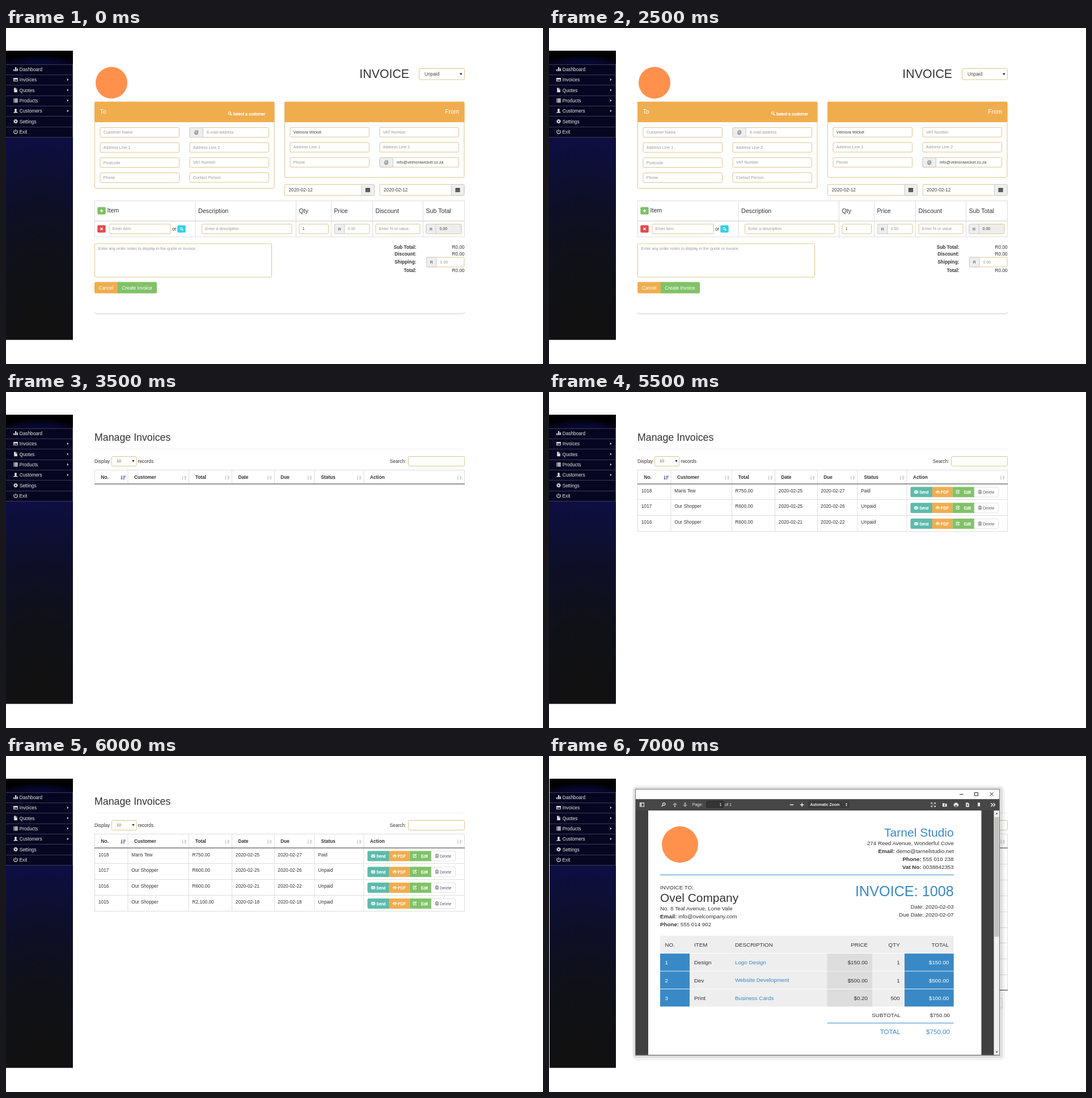
An HTML page for the animation above (8000 ms loop, 947 by 592 pixels).

```html
<!DOCTYPE html>
<html lang="en">
<head>
<meta charset="utf-8">
<title>Invoicing</title>
<style>
html, body { margin: 0; width: 100%; height: 100%; overflow: hidden; background: #fff; }
svg { display: block; width: 947px; height: 592px; font-family: "Liberation Sans", Arial, sans-serif; }
text { white-space: pre; }
</style>
</head>
<body>
<svg id="stage" viewBox="0 0 947 592" xmlns="http://www.w3.org/2000/svg"></svg>
<script>
const LOOP = 8000;
const S = 7.1, M = 8.29, L = 10.65;
const END = 'text-anchor="end"', MID = 'text-anchor="middle"', BOLD = 'font-weight="700"';
const ORANGE = '#f0ad4e', GREEN = '#81c268', BLUE = '#3989c6', LOGO = '#ff914d';

const light = {
  bg: '#fff', line: '#ddd', edge: '#dfc48e', ph: '#999', tx: '#444', ink: '#333', add: '#eee', bar: ORANGE,
  head: '#fff', plus: '#7cbf62', del: '#e2494b', find: '#34cfe6', ok: GREEN, logo: LOGO, frame: '#ccc'
};
const dim = {
  bg: '#828282', line: '#717171', edge: '#7d6d4b', ph: '#494949', tx: '#222', ink: '#1b1b1b', add: '#757575', bar: '#a67936',
  head: '#cfcfcf', plus: '#549a45', del: '#dd6039', find: '#3aa9b0', ok: '#5f8f4e', logo: '#cc7642', frame: '#666'
};

// y is the middle of the capitals
const text = (x, y, s, size = M, fill = '#333', more = '') =>
  `<text x="${x}" y="${(y + size * 0.355).toFixed(2)}" font-size="${size}" fill="${fill}" ${more}>${s}</text>`;
const rect = (x, y, x2, y2, fill, more = '') =>
  `<rect x="${x}" y="${y}" width="${x2 - x}" height="${y2 - y}" fill="${fill}" ${more}/>`;
const box = (x, y, x2, y2, fill, edge, r = 2) =>
  rect(x + 0.5, y + 0.5, x2 - 0.5, y2 - 0.5, fill, `stroke="${edge}" rx="${r}"`);
const line = (d, color, w = 1) => `<path d="${d}" fill="none" stroke="${color}" stroke-width="${w}"/>`;
const group = (id, body, more = '') => `<g id="${id}" ${more}>${body}</g>`;
const heavy = color => `stroke="${color}" stroke-width=".3"`;

// icons in a box from -4 to 4
const fillIcon = d => `<path d="${d}" fill="currentColor" fill-rule="evenodd"/>`;
const lineIcon = (d, w = 1.2) => `<path d="${d}" fill="none" stroke="currentColor" stroke-width="${w}"/>`;
const icons = {
  stats: fillIcon('M-4 0h2v3.5h-2zM-1-4h2.2v7.5h-2.2zM2-1.5h2v5h-2z'),
  card: fillIcon('M-4.2-3.2h8.4v6.4h-8.4zM-3.2-.2v2.3h6.4v-2.3z') + fillIcon('M-2.5 .6h2v.9h-2z'),
  file: fillIcon('M-3-4h3.2v3h2.8v5h-6zM.9-4l2.1 2.3h-2.1z'),
  list: fillIcon('M-4-3.6h1.4v1.4h-1.4zM-2-3.6h6v1.4h-6zM-4-1.5h1.4v1.4h-1.4zM-2-1.5h6v1.4h-6zM-4 .6h1.4v1.4h-1.4zM-2 .6h6v1.4h-6zM-4 2.7h1.4v1.2h-1.4zM-2 2.7h6v1.2h-6z'),
  user: fillIcon('M0-4C2.8-4 2.3-.7 1.1 .6C1.2 1.7 4 1.6 4 3.6H-4C-4 1.6-1.2 1.7-1.1 .6C-2.3-.7-2.8-4 0-4z'),
  cog: '<circle r="2.2" fill="none" stroke="currentColor" stroke-width="1.9"/><circle r="3.5" fill="none" stroke="currentColor" stroke-width="1.3" stroke-dasharray="1.4 1.35"/>',
  off: lineIcon('M-2-2.6A3.4 3.4 0 1 0 2-2.6M0-4.2V0'),
  search: '<circle cx="-.7" cy="-.7" r="2.3" fill="none" stroke="currentColor" stroke-width="1.2"/>' + lineIcon('M1 1L3.5 3.5', 1.6),
  plus: lineIcon('M-3.4 0H3.4M0-3.4V3.4', 2),
  cross: lineIcon('M-2.4-2.4L2.4 2.4M2.4-2.4L-2.4 2.4', 1.8),
  date: fillIcon('M-4-3.6h8v7.2h-8z') + '<path d="M-3.4-1.4h6.8M-3.4 .4h6.8M-3.4 2h6.8" stroke="#ccc" stroke-width=".5"/>',
  mail: fillIcon('M-4-3h8L0 .6zM-4-2.2L-1.4 .1L-4 2.6zM4-2.2L1.4 .1L4 2.6zM-3.6 3L-.9 .6L0 1.4L.9 .6L3.6 3z'),
  eye: fillIcon('M-4.2 0C-2-3.7 2-3.7 4.2 0C2 3.3-2 3.3-4.2 0zM-2.6 0C-1 2.2 1 2.2 2.6 0C2-1.2 1.4-1.5 1.4-1.5C1.6 1-1.6 1-1.4-1.5C-1.4-1.5-2-1.2-2.6 0z'),
  edit: lineIcon('M1-2.9H-3.2V2.9H2.6V.6', 1.1) + lineIcon('M-1 .6L3.4-3', 1.6),
  trash: lineIcon('M-3.2-2.6H3.2M-1-3.6H1M-2.5-2V3.4H2.5V-2M-.9-1V2.4M.9-1V2.4', .9),
  sort: fillIcon('M-3.4-4h1.4v5.4h1.2L-2.7 4L-4.6 1.4h1.2zM2-4L4-1.6H2.8V4H1.2V-1.6H0z') + lineIcon('M1.2 1H4.4M2-1H5', .8),
  sorted: fillIcon('M-3.4-4h1.4v5.4h1.2L-2.7 4L-4.6 1.4h1.2z') + lineIcon('M0-3.2H5M0-1.2H4.2M0 .8H3.2M0 2.8H2.2', 1.2),
  up: fillIcon('M0-4L4 0H1.4V4H-1.4V0H-4z'),
  panel: lineIcon('M-3.5-3.2H3.5V3.2H-3.5zM-1.2-3V3M-3-1H-1.6M-3 1H-1.6', 1.1),
  full: lineIcon('M-4-1.5V-3.7H-1.5M1.5-3.7H4V-1.5M4 1.5V3.7H1.5M-1.5 3.7H-4V1.5M-3.4-3.2L-1-1M3.4-3.2L1-1M3.4 3.2L1 1M-3.4 3.2L-1 1', 1),
  open: fillIcon('M-4-3h3l1 1h4v5.5h-8zM-.6 2.4h1.2V.8h1.4L0-1.2L-2 .8h1.4z'),
  print: fillIcon('M-2.6-3.6h5.2v2h1.8v4h-1.8v1.4h-5.2v-1.4h-1.8v-4h1.8zM-1.7 .5v2.4h3.4V.5z'),
  save: fillIcon('M-3-4h4l2 2v6h-6zM-.6-2v2h-1.4L0 2.4L2 0h-1.4v-2z'),
  mark: fillIcon('M-2-4h4v7.6L0 1.8L-2 3.6z'),
  more: lineIcon('M-3.6-3L-.6 0L-3.6 3M.4-3L3.4 0L.4 3', 1.5)
};
const icon = (name, x, y, color, k = 1) =>
  `<g transform="translate(${x} ${y}) scale(${k})" color="${color}">${icons[name]}</g>`;

function sidebar() {
  const items = [['stats', 'Dashboard'], ['card', 'Invoices', 1], ['file', 'Quotes', 1], ['list', 'Products', 1],
    ['user', 'Customers', 1], ['cog', 'Settings'], ['off', 'Exit']];
  let s = rect(0, 40, 118, 549.5, 'url(#night)') + rect(0, 63.5, 118, 192, '#05051c', 'fill-opacity=".85"');
  items.forEach(([name, label, sub], i) => {
    const y = 72.7 + i * 18.35;
    s += line(`M0 ${Math.round(y - 9.2) + 0.5}H118`, '#3b3b58') + icon(name, 17, y, '#ddd', 0.95) +
      text(i === 6 ? 23.5 : 23.7, y + 0.3, label, M, '#e8e8e8');
    if (sub) s += `<path d="M107.8 ${y - 2.2}l2.6 2.2l-2.6 2.2z" fill="#ddd"/>`;
  });
  return s + line('M0 192.5H118M117.5 63V193', '#3b3b58');
}

function field(c, x, y, x2, label, filled, y2 = y + 18) {
  return box(x, y, x2, y2, c.bg, c.edge) + text(x + 6.3, (y + y2) / 2 - 0.2, label, S, filled ? c.tx : c.ph);
}
function addon(c, x, y, x2, y2, mark, size = S) {
  return box(x, y, x2, y2, c.add, c.frame) + text((x + x2) / 2, (y + y2) / 2, mark, size, c.tx, MID);
}

function form(c) {
  const panel = (x, x2, y2) => box(x, 130, x2, y2, c.bg, c.edge, 2.4) + rect(x, 129.7, x2, 166, c.bar, 'rx="2"');
  const date = (x, x2) => box(x, 275, x2, 295.5, c.bg, c.edge) + box(x2 - 23.5, 275, x2, 295.5, c.add, c.frame) +
    text(x + 7.5, 285.5, '2020-02-12', M, c.tx) + icon('date', x2 - 12, 285.5, c.ink);
  let s = `<circle cx="186" cy="96.5" r="28" fill="${c.logo}"/>` +
    text(711, 80.8, 'INVOICE', 21.32, c.ink, END) +
    box(728, 71, 809, 91.5, c.bg, c.edge) + text(738, 81.5, 'Unpaid', M, c.tx) +
    `<path d="M800 79.5h4.6l-2.3 4z" fill="${c.ink}"/>`;

  s += panel(156, 473.5, 283) + text(165.5, 147.5, 'To', L, c.head) + icon('search', 395, 150.5, c.head, 0.9) +
    text(400.3, 151, 'Select a customer', S, c.head, heavy(c.head));
  ['Customer Name', 'Address Line 1', 'Postcode', 'Phone'].forEach((n, i) => s += field(c, 165.5, 175 + i * 26.6, 306, n));
  ['', 'Address Line 2', 'VAT Number', 'Contact Person'].forEach((n, i) => s += field(c, 323.5, 175 + i * 26.45, 464, n));
  s += addon(c, 323.5, 175, 348, 193, '@', M) + text(354, 183.8, 'E-mail address', S, c.ph);

  s += panel(491, 808.5, 264) + text(799, 147.5, 'From', L, c.head, END);
  ['Velmora Wicket', 'Address Line 1', 'Phone'].forEach((n, i) => s += field(c, 500.5, 174.5 + i * 26.6, 641, n, !i));
  ['VAT Number', 'Address Line 2', ''].forEach((n, i) => s += field(c, 658.5, 174.5 + i * 26.6, 799, n));
  s += addon(c, 658.5, 228, 683, 245.5, '@', M) + text(689, 236.8, 'info@velmorawicket.co.za', S, c.tx) +
    date(491, 650) + date(658.5, 808.5);

  s += line('M156.5 304.5H808.5V368H156.5zM334 304V368M511.5 304V368M573.5 304V368M646.5 304V368M735.5 304V368', c.line) +
    line('M156 340H809', c.line, 1.6);
  [['Item', 178.5, 321], ['Description', 339], ['Qty', 516.5], ['Price', 578.5], ['Discount', 651.5], ['Sub Total', 740.5]]
    .forEach(([n, x, y = 322.7]) => s += text(x, y, n, L, c.ink));
  const chip = (x, y, color, name) => rect(x, y, x + 14.4, y + 13, color, 'rx="1.8"') + icon(name, x + 7.2, y + 6.5, '#fff', 0.82);
  s += chip(161.3, 315.5, c.plus, 'plus') + chip(161.3, 347.5, c.del, 'cross') + chip(302.3, 347.5, c.find, 'search') +
    field(c, 181.5, 345, 291, 'Enter item') + text(293, 353.8, 'or', M, c.ink) +
    field(c, 345, 345, 504.5, 'Enter a description') + field(c, 516.5, 345, 569, '1', true) +
    field(c, 579, 345, 641.5, '') + addon(c, 579, 345, 597.5, 363, 'R') + text(602.5, 353.8, '0.00', S, c.ph) +
    field(c, 651.5, 345, 730.5, 'Enter % or value') +
    box(740.5, 345, 803.5, 363, c.add, c.edge) + addon(c, 740.5, 345, 758.5, 363, 'R') + text(764.5, 353.8, '0.00', S, c.tx);

  s += box(156, 379.5, 469, 439.5, c.bg, c.edge) +
    text(162.5, 388.7, 'Enter any order notes to display in the quote or invoice.', S, c.ph);
  [['Sub Total:', 386], ['Discount:', 398], ['Shipping:', 412.2], ['Total:', 427.5]].forEach(([n, y], i) => {
    s += text(723.5, y, n, M, c.ink, BOLD + END.padStart(22));
    if (i !== 2) s += text(808.7, y, 'R0.00', M, c.ink, END);
  });
  s += field(c, 741, 403.5, 808.5, '') + addon(c, 741, 403.5, 759.5, 421.5, 'R') + text(765.5, 412.3, '0.00', S, c.ph);
  s += rect(156, 447.5, 199, 467.5, c.bar, 'rx="2"') + rect(197, 447.5, 266, 467.5, c.ok, 'rx="2"') + rect(197, 447.5, 200, 467.5, c.ok) +
    text(163.7, 457.7, 'Cancel', M, c.head) + text(204.3, 457.7, 'Create Invoice', M, c.head);
  return s + line('M156.5 500.5Q156.5 503.5 160 503.5H805Q808.5 503.5 808.5 500.5', c.frame);
}

function modal() {
  let s = rect(288, 51, 661, 287, '#000', 'fill-opacity=".06" rx="12"') + rect(291, 54, 656, 281, '#000', 'fill-opacity=".1" rx="8"') +
    rect(294, 57, 653, 277, '#000', 'fill-opacity=".22" rx="5"') + box(296, 58, 651, 274, '#fff', '#666', 3);
  s += text(305.5, 74.7, 'Select a customer', L) + text(637.8, 72.5, '×', 12.5, '#bbb', BOLD + ' ' + MID) +
    line('M297 91.5H650M297 235.5H650', '#e5e5e5') + text(537.5, 109.3, 'Search:', M, '#333', END) +
    box(541.5, 100.5, 642, 118.5, '#fff', light.edge);
  s += line('M305.5 150V125.5H641.5V206M305.5 150V206M422.5 125V206M537 125V206M305 178H642', '#ddd') +
    line('M305 149.7H642M305 205.7H642', '#222', 1.1);
  [['Name', 316.5, 414], ['Contact', 433.5, 528.5], ['Action', 548, 633]].forEach(([n, x, sx], i) =>
    s += text(x, 137.5, n, M, '#333', BOLD) + icon(i === 1 ? 'sorted' : 'sort', sx, 138.5, i === 1 ? '#5667a4' : '#ccc', 0.95));
  ['Our Shopper', 'Maris Tew'].forEach((n, i) => {
    const y = 161.3 + i * 27.8;
    s += text(311.8, y, n) + rect(543, y - 6.3, 635, y + 11.7, ORANGE, 'rx="1.8"') +
      text(589, y + 2.7, 'Select', S, '#fff', MID + ' ' + heavy('#fff'));
  });
  return s + text(305.5, 220.4, 'Showing 1 to 2 of 2 entries') +
    rect(600, 244.5, 641.5, 264.5, '#ddd', 'rx="2"') + text(608, 254.7, 'Cancel');
}

function manage() {
  const heads = [['No.', 167.5, 206.5], ['Customer', 226, 314], ['Total', 333.7, 390], ['Date', 409.5, 464.5],
    ['Due', 484.3, 535.5], ['Status', 555.5, 622.5], ['Action', 642, 799.5]];
  const cols = [156.5, 215, 322.5, 398.5, 473.5, 544, 631, 808.5];
  const textX = [163, 221.3, 328.5, 404.8, 479.3, 550.3];
  const who = ['Our Shopper', 'Maris Tew'];
  const rows = [
    [1018, who[1], 'R750.00', '2020-02-25', '2020-02-27', 'Paid'],
    [1017, who[0], 'R600.00', '2020-02-25', '2020-02-26', 'Unpaid'],
    [1016, who[0], 'R600.00', '2020-02-21', '2020-02-22', 'Unpaid'],
    [1015, who[0], 'R2,100.00', '2020-02-18', '2020-02-18', 'Unpaid'],
    [1014, who[1], 'R1,200.00', '2020-02-17', '2020-02-12', 'Unpaid']
  ];
  const uprights = (y, y2) => line(cols.map(x => `M${x} ${y}V${y2}`).join(''), '#ddd');
  let s = text(156, 79.5, 'Manage Invoices', 17.77) + line('M156 100.5H809', '#eee') +
    text(156, 121.7, 'Display') + box(186, 113, 230.5, 131, '#fff', light.edge) + text(195, 121.8, '10', S, '#555') +
    '<path d="M222.2 120h4.4l-2.2 3.8z" fill="#333"/>' + text(232.5, 121.7, 'records') +
    text(705.3, 121.7, 'Search:', M, '#333', END) + box(709, 113, 809, 131, '#fff', light.edge) +
    line('M156 137.5H809', '#ddd') + uprights(137, 162);
  heads.forEach(([n, x, sx], i) =>
    s += text(x, 150.2, n, M, '#333', BOLD) + icon(i ? 'sort' : 'sorted', sx, 151, i ? '#ccc' : '#5667a4', 0.95));
  rows.forEach((cells, i) => {
    const y = 162 + i * 27.9, m = y + 14.3;
    let r = uprights(y, y + 28) + line(`M156 ${Math.floor(y + 27.9) + 0.5 - (i > 3)}H809`, '#ddd');
    cells.forEach((v, k) => r += text(textX[k], y + 11.6, v));
    r += rect(637.5, m - 9, 678, m + 9, '#5dbbab', 'rx="2"') + rect(675.5, m - 9, 711.5, m + 9, ORANGE) +
      rect(711.5, m - 9, 750, m + 9, GREEN) + box(749.5, m - 9, 793, m + 9, '#fff', '#e3e3e3') +
      icon('mail', 647.5, m, '#fff', 0.9) + icon('eye', 685.5, m, '#fff', 0.95) + icon('edit', 721, m - 0.4, '#fff', 0.9) + icon('trash', 760, m - 0.3, '#5b5b72', 0.9);
    [['Send', 653], ['PDF', 690.8], ['Edit', 731.8]].forEach(([n, x]) => r += text(x, m + 0.2, n, S, '#fff', heavy('#fff')));
    s += group('row' + i, r + text(765, m + 0.2, 'Delete', S, '#5b5b72'));
  });
  return s + line('M156 162H809', '#333', 1.2);
}

function behind() {
  let s = line('M790 100.5H809', '#eee') + box(709, 113, 809, 131, '#fff', light.edge) +
    line('M790 137.5H808.5V412', '#ddd') + icon('sort', 799.5, 151, '#ccc', 0.95);
  for (let i = 1; i < 9; i++) s += line(`M790 ${Math.round(162 + i * 27.9) + 0.5}H809`, '#ddd');
  return s + line('M790 162H809M790 412.5H809', '#333', 1.2) + box(780, 426.5, 800, 444.5, '#fff', '#ddd');
}

function pdf() {
  const P = 9.77;
  let s = behind() + rect(146.5, 52, 804, 536.5, '#000', 'fill-opacity=".05" rx="9"') + rect(149, 55, 800, 532, '#000', 'fill-opacity=".08" rx="5"') +
    rect(152, 58, 795, 527.5, '#404040') + rect(152, 58, 795, 76, '#fff') + rect(152, 76, 795, 96, '#474747') +
    rect(175, 96, 762.5, 527, '#fff') + rect(784.5, 96, 795, 527, '#f1f1f1') + rect(785.5, 107.5, 793.5, 318.5, '#c1c1c1') +
    '<path d="M787.3 102.5h4.6l-2.3-2.6zM787.3 520.5h4.6l-2.3 2.6z" fill="#505050"/>' +
    line('M152.5 58.5H794.5V527H152.5z', '#777') +
    line('M724 67.5H730.5M750.5 64.5H756.5V70H750.5zM777.5 64.2L783.7 70.2M783.7 64.2L777.5 70.2', '#222');
  // viewer toolbar
  const pale = '#eee';
  s += icon('panel', 164, 85.8, pale) + icon('search', 202, 85.5, pale, 0.95).replace('scale(', 'scale(-1 1) scale(') +
    icon('up', 222, 86, '#999') + icon('up', 240, 86, '#999').replace('scale(', 'rotate(180) scale(') +
    text(252.7, 85.3, 'Page:', S, pale) + box(277, 79, 308.5, 91.5, '#343434', '#2a2a2a') + text(304.5, 85.4, '1', S, '#fff', END) +
    text(310, 85.3, 'of 1', S, pale) + line('M424.8 86H431.2M443 86H449.4M446.2 82.8V89.2', pale, 1.4) +
    rect(457, 79, 530, 92, '#3c3c3c', 'rx="1.5"') + text(460.5, 85.3, 'Automatic Zoom', 6.6, pale, BOLD) +
    `<path d="M522.8 85h3.4l-1.7-2.2zM522.8 86.4h3.4l-1.7 2.2z" fill="${pale}"/>`;
  ['full', 'open', 'print', 'save', 'mark'].forEach((n, i) => s += icon(n, 677.7 + i * 20.1, 86, pale, 0.95));
  s += icon('more', 783, 86, pale);
  // page
  const tag = (k, v) => `<tspan font-weight="700">${k}:</tspan> ${v}`;
  s += `<circle cx="231" cy="156" r="32" fill="${LOGO}"/>` + text(713.7, 134.7, 'Tarnel Studio', 21, BLUE, END);
  ['274 Reed Avenue, Wonderful Cove', tag('Email', 'demo@tarnelstudio.net'), tag('Phone', '555 010 238'), tag('Vat No', '0038842353')]
    .forEach((v, i) => s += text(713.7, 153.8 + i * 14, v, P, '#333', END));
  s += line('M196 209.5H713.7', BLUE) + text(196, 231.2, 'INVOICE TO:', P) + text(196, 249.8, 'Ovel Company', 20.9);
  ['No. 8 Teal Avenue, Lone Vale', tag('Email', 'info@ovelcompany.com'), tag('Phone', '555 014 902')]
    .forEach((v, i) => s += text(196, 268.2 + i * 14, v, P));
  s += text(713.7, 238, 'INVOICE: 1008', 25.2, BLUE, END) + text(713.7, 265.5, 'Date: 2020-02-03', P, '#333', END) +
    text(713.7, 279.5, 'Due Date: 2020-02-07', P, '#333', END);
  const rows = [['NO.', 'ITEM', 'DESCRIPTION', 'PRICE', 'QTY', 'TOTAL'], ['1', 'Design', 'Logo Design', '$150.00', '1', '$150.00'],
    ['2', 'Dev', 'Website Development', '$500.00', '1', '$500.00'], ['3', 'Print', 'Business Cards', '$0.20', '500', '$100.00']];
  const xs = [204.5, 256, 328, 562, 618.7, 705.3];
  rows.forEach((r, i) => {
    const y = 316.7 + i * 31.4, y2 = y + 30.5;
    s += rect(196, y, 713.7, y2, '#eee');
    if (i) s += rect(196, y, 248, y2, BLUE) + rect(490.5, y, 570, y2, '#ddd') + rect(627, y, 713.7, y2, BLUE);
    r.forEach((v, k) => s += text(xs[k], y + 15.8 - (i && k === 2 ? 0.5 : 0), v, P,
      !i ? '#333' : k % 5 === 0 ? '#fff' : k === 2 ? BLUE : '#333', k > 2 ? END : ''));
  });
  return s + text(620, 456.2, 'SUBTOTAL', P, '#333', END) + text(707, 456.2, '$750.00', P, '#333', END) +
    line('M490.5 470.5H713.7', BLUE) + text(620, 485.7, 'TOTAL', 11.6, BLUE, END) + text(707, 485.7, '$750.00', 11.6, BLUE, END) +
    rect(0, 40, 1, 550, '#fff');
}

const stops = [[0, '#111'], [.1, '#111'], [.3, '#101118'], [.5, '#0e0f28'], [.7, '#0e0e42'], [.9, '#0c0c4a'], [.955, '#0a0a3c'], [.975, '#04041a'], [.99, '#000']];
const stage = document.getElementById('stage');
stage.innerHTML = `<defs><radialGradient id="night" gradientUnits="userSpaceOnUse" cx="0" cy="0" r="1" gradientTransform="translate(59 549) scale(300 509)">${
  stops.map(([o, c]) => `<stop offset="${o}" stop-color="${c}"/>`).join('')}</radialGradient></defs>` +
  group('shade', rect(0, 41, 947, 550.5, dim.bg)) + group('menu', sidebar()) +
  group('form', form(light)) +
  group('dialog', group('dimmed', form(dim), 'transform="translate(0 1)"') + modal() + line('M0 550H947', '#503c44')) +
  group('manage', manage()) + group('viewer', pdf());

const part = id => document.getElementById(id);
const show = (id, on) => part(id).style.display = on ? '' : 'none';

function draw(t) {
  const dialog = t >= 500 && t < 2500;
  show('form', t < 500 || (t >= 2500 && t < 3500));
  show('shade', dialog);
  show('dialog', dialog);
  show('manage', t >= 3500 && t < 7000);
  show('viewer', t >= 7000);
  part('menu').setAttribute('transform', `translate(0 ${dialog ? 1 : 0})`);
  for (let i = 0; i < 5; i++) show('row' + i, t >= 4500 + i * 500);
}

const start = performance.now();
function tick() {
  draw((performance.now() - start) % LOOP);
  requestAnimationFrame(tick);
}
tick();
</script>
</body>
</html>
```
